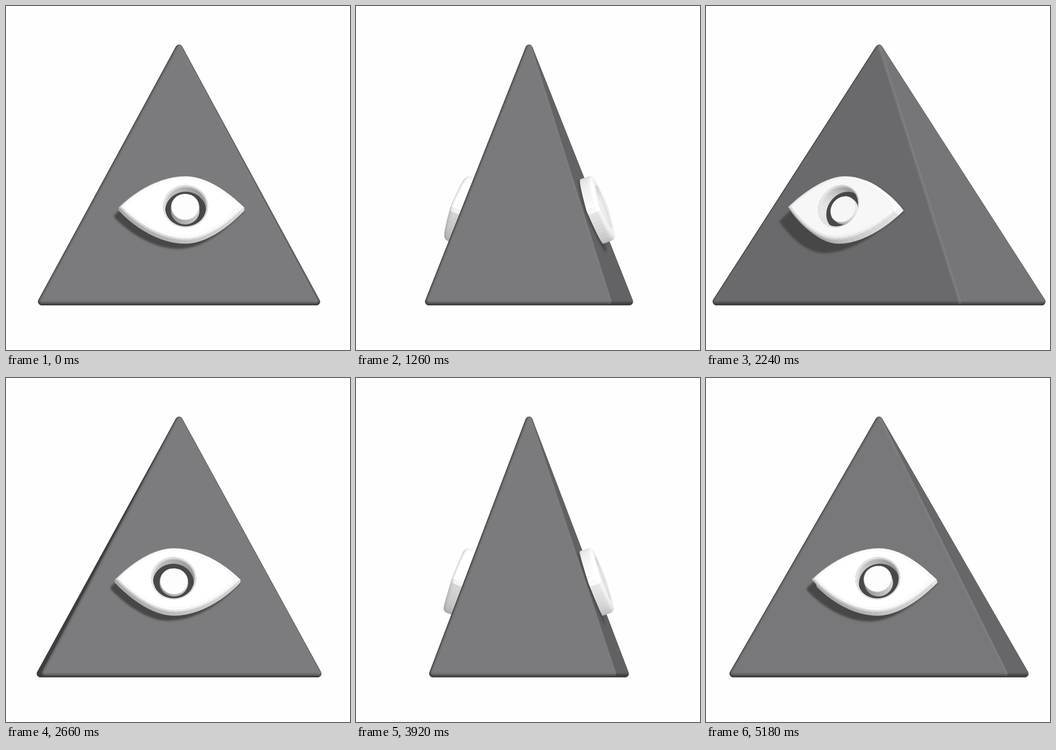
An HTML page with a canvas for the animation above (5250 ms loop, 748 px wide and 748 px high).

```html
<!DOCTYPE html>
<html lang="en">
<head>
<meta charset="utf-8">
<title>Turning pyramid with eye</title>
<style>
html, body { margin: 0; width: 100%; height: 100%; overflow: hidden; background: #fefefe; }
canvas { display: block; width: 748px; height: 748px; }
</style>
</head>
<body>
<canvas id="stage" width="748" height="748"></canvas>
<script>
const ctx = document.getElementById('stage').getContext('2d');
const LOOP = 5250, TICK = 70;
const START = -0.5, STEP = 4.785;          // degrees
const CX = 376.3, GROUND = 642.9;
const A = 297.3, B = 196.3, H = 551, R = 7.5; // half width, half depth, height, edge radius
const rad = d => d * Math.PI / 180;

const AZ = rad(25);                        // shading light, azimuth only
const SUN_AZ = rad(31), SUN_EL = rad(40);  // light that casts shadows
const SUN = [Math.sin(SUN_AZ) * Math.cos(SUN_EL), Math.sin(SUN_EL), Math.cos(SUN_AZ) * Math.cos(SUN_EL)];

const dot = (a, b) => a.reduce((sum, v, i) => sum + v * b[i], 0);
const add = (a, b, k = 1) => a.map((v, i) => v + b[i] * k);
const unit = a => { const l = Math.hypot(...a) || 1; return a.map(v => v / l); };
const mix = (a, b, t) => unit(a.map((v, i) => v * (1 - t) + b[i] * t));
const turn = (p, t) => {
  const c = Math.cos(t), s = Math.sin(t);
  return [p[0] * c + p[2] * s, p[1], p[2] * c - p[0] * s];
};
const facingLight = n => n[0] * Math.sin(AZ) + n[2] * Math.cos(AZ);

function stone(n) {
  const g = Math.max(62, 60 + 62 * facingLight(n) + (n[1] < 0 ? 45 : 32) * n[1]);
  return `rgb(${g | 0},${g | 0},${(g | 0) + 2})`;
}
function plaster(n, k = 1) {
  const g = Math.min(255, 197 + 70 * facingLight(n) + 30 * n[1]) * k | 0;
  return `rgb(${g},${g},${g})`;
}

function trace(pts) {
  pts.forEach((p, i) => ctx[i ? 'lineTo' : 'moveTo'](CX + p[0], GROUND - p[1]));
  ctx.closePath();
}
function poly(pts, color, line = 0.5) {
  ctx.beginPath();
  trace(pts);
  ctx.fillStyle = ctx.strokeStyle = color;
  ctx.lineWidth = line;
  ctx.lineJoin = 'round';
  ctx.fill();
  ctx.stroke();
}

// Rounded strip along an edge, from normal n1 to normal n2
function strip(p, q, n1, n2) {
  const parts = 10;
  for (let i = 0; i < parts; i++) {
    const a = mix(n1, n2, i / parts), b = mix(n1, n2, (i + 1) / parts);
    const m = mix(a, b, 0.5);
    if (m[2] < 0) continue;
    poly([add(p, a, R), add(q, a, R), add(q, b, R), add(p, b, R)], stone(m));
  }
}

// Rounded corner between the normals n1 and n2 and a pole
function corner(p, n1, n2, pole) {
  const parts = 5;
  const at = (i, j) => mix(mix(n1, n2, i / parts), pole, j / parts);
  for (let i = 0; i < parts; i++) {
    for (let j = 0; j < parts; j++) {
      const m = at(i + 0.5, j + 0.5);
      if (m[2] < 0) continue;
      const ring = [at(i, j), at(i + 1, j), at(i + 1, j + 1), at(i, j + 1)];
      poly(ring.map(n => add(p, n, R)), stone(m));
    }
  }
}

function pyramid(t) {
  const top = [0, H, 0], up = [0, 1, 0], down = [0, -1, 0];
  const base = [[-A, 0, B], [A, 0, B], [A, 0, -B], [-A, 0, -B]].map(p => turn(p, t));
  const normals = [[0, B, H], [H, A, 0], [0, B, -H], [-H, A, 0]].map(n => turn(unit(n), t));
  const xs = base.map(p => p[0]);
  poly([top, [Math.max(...xs), 0, 0], [Math.min(...xs), 0, 0]], '#505051', 2 * R);
  for (let i = 0; i < 4; i++) {
    const p = base[i], q = base[(i + 1) % 4], n = normals[i], prev = normals[(i + 3) % 4];
    strip(p, q, n, down);
    strip(p, top, prev, n);
    corner(p, prev, n, down);
    corner(top, prev, n, up);
    if (n[2] > 0) poly([p, q, top].map(v => add(v, n, R)), stone(n));
  }
}

// Eye outline in the plane of its face, with mitred normals
function outline() {
  const cubic = (a, b, c, d, t) => {
    const s = 1 - t;
    return a * s * s * s + 3 * b * s * s * t + 3 * c * s * t * t + d * t * t * t;
  };
  const upper = [], parts = 12;
  for (let i = 0; i < parts; i++) {
    const t = i / parts;
    upper.push([cubic(-130, -92, -38, 15, t), cubic(0, 40, 72, 72, t)]);
  }
  for (let i = 0; i <= parts; i++) {
    const t = i / parts;
    upper.push([cubic(15, 58, 105, 143, t), cubic(72, 72, 40, 0, t)]);
  }
  const lower = upper.slice(1, -1).reverse().map(p => [p[0], -p[1] * 1.06]);
  const pts = upper.concat(lower), n = pts.length;
  const normal = (a, b) => unit([a[1] - b[1], b[0] - a[0]]);
  return pts.map((p, i) => {
    const before = normal(pts[(i + n - 1) % n], p), after = normal(p, pts[(i + 1) % n]);
    const o = unit(add(before, after));
    return { p, o: o.map(v => v / dot(o, after)) };
  });
}
function circle(u, r) {
  return Array.from({ length: 48 }, (_, i) => {
    const a = i / 48 * 2 * Math.PI, o = [Math.cos(a), Math.sin(a)];
    return { p: [u + r * o[0], r * o[1]], o };
  });
}

const EYE = outline(), HOLE = circle(15.5, 45), PUPIL = circle(14.5, 30.5);
const MID = [0, GROUND - 446, 132];
const UP = unit([0, H, -B]), OUT = unit([0, B, H]);

// Profiles: [inset, height, tilt of the normal towards the front]
const EYE_RINGS = [[0, 3.5, 0], [0, 22, 0], [1.2, 26.5, 0.25], [4, 30, 0.55], [8, 31.5, 0.9]];
const HOLE_RINGS = [[0, 0, 0], [0, 25, 0], [0.6, 28, 0.25], [2, 30.3, 0.55], [4, 31.5, 0.9]];

function eye({ t, flip, pupil }) {
  const ux = turn([flip, 0, 0], t), vy = turn(UP, t), nz = turn(OUT, t), c = turn(MID, t);
  const place = (u, v, h) => add(add(add(c, ux, u), vy, v), nz, h);
  const side = o => add(ux.map(v => v * o[0]), vy, o[1]);
  const ring = (shape, [inset, h]) =>
    shape.map(({ p, o }) => place(p[0] - o[0] * inset, p[1] - o[1] * inset, h));

  function walls(shape, rings, sign, k) {
    const n = shape.length;
    for (let j = 1; j < rings.length; j++) {
      const lo = ring(shape, [rings[j - 1][0] * sign, rings[j - 1][1]]);
      const hi = ring(shape, [rings[j][0] * sign, rings[j][1]]);
      const tilt = (rings[j - 1][2] + rings[j][2]) / 2;
      for (let i = 0; i < n; i++) {
        const e = (i + 1) % n;
        const o = unit(add(shape[i].o, shape[e].o)).map(v => v * sign);
        const m = mix(side(o), nz, tilt);
        if (m[2] > 0) poly([lo[i], lo[e], hi[e], hi[i]], plaster(m, k));
      }
    }
  }

  const front = nz[2] > 0;
  if (front) castShadow(t, h => ring(EYE, [h > 22 ? 3 : 0, h]), nz);
  walls(EYE, EYE_RINGS, 1, 1);
  if (!front) return;
  poly(ring(EYE, EYE_RINGS[4]), plaster(nz));

  const rim = ring(HOLE, [-4, 31.5]);
  ctx.save();
  ctx.beginPath();
  trace(rim);
  ctx.clip();
  poly(rim, '#484849');
  walls(HOLE, HOLE_RINGS, -1, 0.92);
  walls(PUPIL, [[0, 0, 0], [0, pupil - 1.5, 0], [1, pupil, 0.5]], 1, 0.94);
  poly(ring(PUPIL, [1, pupil]), plaster(nz, 0.995));
  ctx.restore();
}

// The shadow is the eye swept along the light onto its face
function castShadow(t, layer, nz) {
  const slope = dot(SUN, nz);
  if (slope < 0.08) return;
  ctx.save();
  ctx.beginPath();
  trace([[0, H, 0], [-A, 0, B], [A, 0, B]].map(p => add(turn(p, t), nz, R)));
  ctx.clip();
  ctx.filter = 'blur(2px)';
  ctx.beginPath();
  for (let h = 0; h <= 30; h += 2) {
    trace(layer(h).map(p => add(p, SUN, -h / slope)));
  }
  ctx.fillStyle = '#474748';
  ctx.fill();
  ctx.restore();
}

function draw(now) {
  const k = Math.floor((now % LOOP) / TICK);
  const t = rad(START + STEP * k);
  ctx.fillStyle = '#fefefe';
  ctx.fillRect(0, 0, 748, 748);
  const eyes = [{ t, flip: 1, pupil: 28 }, { t: t + Math.PI, flip: -1, pupil: 12 }];
  const front = e => Math.cos(e.t) > 0;
  eyes.filter(e => !front(e)).forEach(eye);
  pyramid(t);
  eyes.filter(front).forEach(eye);
}

const begin = performance.now();
function loop() {
  draw(performance.now() - begin);
  requestAnimationFrame(loop);
}
loop();
</script>
</body>
</html>
```
